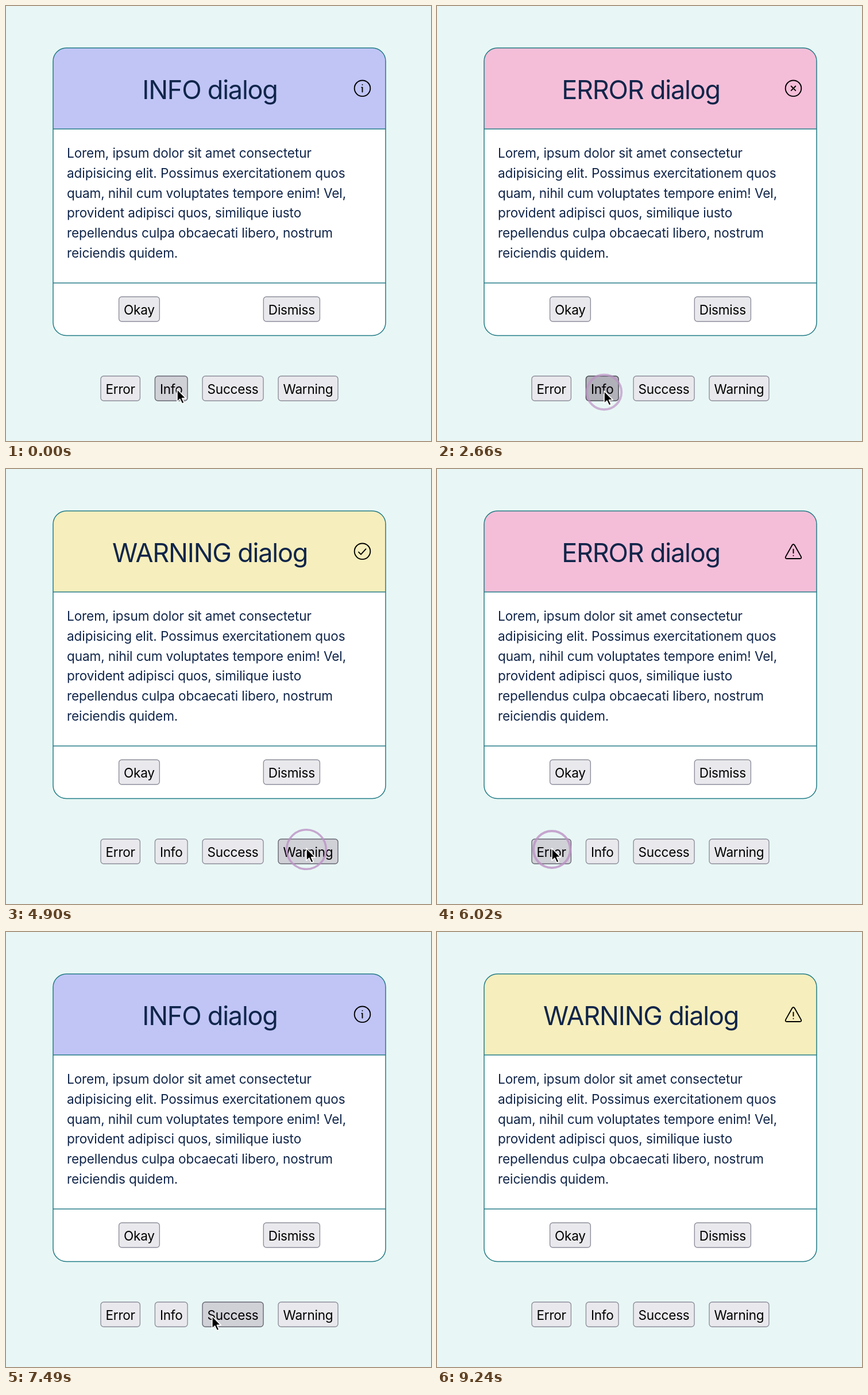
An HTML page for the animation above (9660 ms loop, 740 px wide and 757 px high).

```html
<!DOCTYPE html>
<html lang="en">
<head>
<meta charset="utf-8">
<title>Dialog variants</title>
<style>
  html, body { margin: 0; width: 100%; height: 100%; overflow: hidden; background: #e8f7f5; }
  svg { display: block; font: 22.6px Inter, sans-serif; letter-spacing: -.005em; }
  .copy { fill: #10254a; }
  #title { font-size: 45px; letter-spacing: -.027em; text-anchor: middle; }
  .line { fill: none; stroke: #237c86; stroke-width: 1.5; }
  .button { letter-spacing: -.011em; }
  .button rect { fill: #e9e9ed; stroke: #8f8f9d; stroke-width: 1.4; }
  .button text { text-anchor: middle; }
  .button.hover rect { fill: #d0d0d7; stroke: #676774; }
  .button.active rect { fill: #b1b1b9; stroke: #484851; }
  #icon { fill: none; stroke: #000; stroke-width: 1.9; stroke-linecap: round; stroke-linejoin: round; }
  #ring { fill: none; stroke: #bd93c6; }
</style>
</head>
<body>
<svg width="740" height="757" viewBox="0 0 740 757">
  <rect x="82" y="73" width="579" height="500.5" rx="23" fill="#fff"/>
  <path id="header" d="M82 214V96a23 23 0 0 1 23-23H638a23 23 0 0 1 23 23V214Z"/>
  <path class="line" d="M82 214H661M82 482H661"/>
  <rect class="line" x="82" y="73" width="579" height="500.5" rx="23"/>
  <text id="title" class="copy" x="355" y="162"></text>
  <path id="icon"/>
  <g id="body" class="copy"></g>
  <g id="buttons"></g>
  <circle id="ring"/>
  <path id="cursor" d="M0 0V21.5L4.8 17L8.6 25L12.2 23.4L8.6 15.6H15.4Z" stroke="#fff" stroke-width="1.6" stroke-linejoin="round"/>
</svg>
<script>
const LOOP = 9660, STEP = 70, EXIT = 9240;
const HOLD = 140, REST = 80, ICON_DELAY = 100, RING_FADE = 350;
const $ = id => document.getElementById(id);

const circle = 'M606.7 143.3a13.8 13.8 0 1 0 27.6 0a13.8 13.8 0 1 0-27.6 0';
const variants = {
  Error: { color: '#f5bed8', icon: circle + 'M616.7 139.5l7.6 7.6m0-7.6l-7.6 7.6' },
  Info: { color: '#c0c5f6', icon: circle + 'M620.5 137v.1M619.3 141.6h1.2V149.5' },
  Success: { color: '#bff6c5', icon: circle + 'M614 144.6l4 4l8.6-9.4' },
  Warning: { color: '#f6eebc', icon: 'M618.5 132.3q2-2.6 4 0L633.8 152.4q1.6 3.6-2 3.6H609.2q-3.6 0-2-3.6ZM620.5 139.8v6.4M620.5 150.6v.1' }
};

// The buttons are pressed in this order, over and over
const order = ['Success', 'Warning', 'Error', 'Info'];
const clicks = [
  [560, 390, 648], [1120, 521, 660], [1820, 203, 667], [2570, 291, 670],
  [3700, 391, 655], [4720, 523, 660], [5880, 200, 660], [6990, 296, 660],
  [7770, 363, 662], [8740, 523, 662]
].map(([down, x, y], i) => ({ down, up: down + HOLD, x, y, name: order[i % 4] }));

const path = [{ up: 200, x: 298, y: 667 }, ...clicks, { down: EXIT, x: 548, y: 723 }];

$('body').innerHTML = [
  'Lorem, ipsum dolor sit amet consectetur',
  'adipisicing elit. Possimus exercitationem quos',
  'quam, nihil cum voluptates tempore enim! Vel,',
  'provident adipisci quos, similique iusto',
  'repellendus culpa obcaecati libero, nostrum',
  'reiciendis quidem.'
].map((line, i) => `<text x="106" y="${264 + i * 34.8}">${line}</text>`).join('');

function buttonRow(names, y, gap) {
  const row = names.map(name => {
    $('buttons').insertAdjacentHTML('beforeend',
      `<g class="button"><rect y="${y}" height="43" rx="5"/><text y="${y + 30.5}">${name}</text></g>`);
    const node = $('buttons').lastChild;
    return { node, y, w: node.lastChild.getComputedTextLength() + 17 };
  });
  let x = 371.5 - (row.reduce((sum, b) => sum + b.w + gap, -gap)) / 2;
  for (const b of row) {
    b.x = x;
    b.node.firstChild.setAttribute('x', x);
    b.node.firstChild.setAttribute('width', b.w);
    b.node.lastChild.setAttribute('x', x + b.w / 2);
    x += b.w + gap;
  }
  return row;
}

const buttons = [
  ...buttonRow(['Okay', 'Dismiss'], 506, 181),
  ...buttonRow(['Error', 'Info', 'Success', 'Warning'], 644, 26)
];

// Travel takes two thirds of the pause between presses, sagging in an arc
function cursorAt(t) {
  const i = path.findIndex(p => p.down > t);
  const from = path[i - 1], to = path[i];
  const leave = from.up + REST;
  const p = Math.min(1, Math.max(0, (t - leave) / (to.down - leave) * 1.5));
  const e = p * (2 - p), dx = to.x - from.x;
  const sag = .14 * Math.abs(dx) * Math.sin(Math.PI * p);
  return [from.x + dx * e, from.y + (to.y - from.y) * e + sag];
}

function variantAt(t) {
  const done = clicks.filter(c => c.up <= t);
  return done.length ? done[done.length - 1].name : 'Info';
}

function drawRing(t) {
  const click = clicks.find(c => t >= c.down && t < c.up + RING_FADE);
  $('ring').style.display = click ? '' : 'none';
  if (!click) return;
  const grow = Math.min(1, (t - click.down) / 110);
  const fade = Math.max(0, (t - click.up) / RING_FADE);
  const attrs = {
    cx: click.x, cy: click.y + 2, r: 22 + 10 * grow + 20 * fade,
    'stroke-width': 4 * (1 - fade), opacity: .2 + .6 * grow
  };
  for (const key in attrs) $('ring').setAttribute(key, attrs[key]);
}

function draw(t) {
  const name = variantAt(t), visible = t < EXIT;
  $('title').textContent = name.toUpperCase() + ' dialog';
  $('header').setAttribute('fill', variants[name].color);
  $('icon').setAttribute('d', variants[variantAt(t - ICON_DELAY)].icon);
  $('cursor').style.display = visible ? '' : 'none';
  const [x, y] = visible ? cursorAt(t) : [0, 0];
  $('cursor').setAttribute('transform', `translate(${x} ${y})`);
  const pressed = clicks.some(c => t >= c.down && t < c.up);
  for (const b of buttons) {
    const over = x >= b.x && x <= b.x + b.w && y >= b.y && y <= b.y + 43;
    b.node.classList.toggle('hover', over);
    b.node.classList.toggle('active', over && pressed);
  }
  drawRing(t);
}

const start = performance.now();
function tick() {
  const t = (performance.now() - start) % LOOP;
  draw(Math.floor(t / STEP) * STEP);
  requestAnimationFrame(tick);
}
tick();
</script>
</body>
</html>
```
